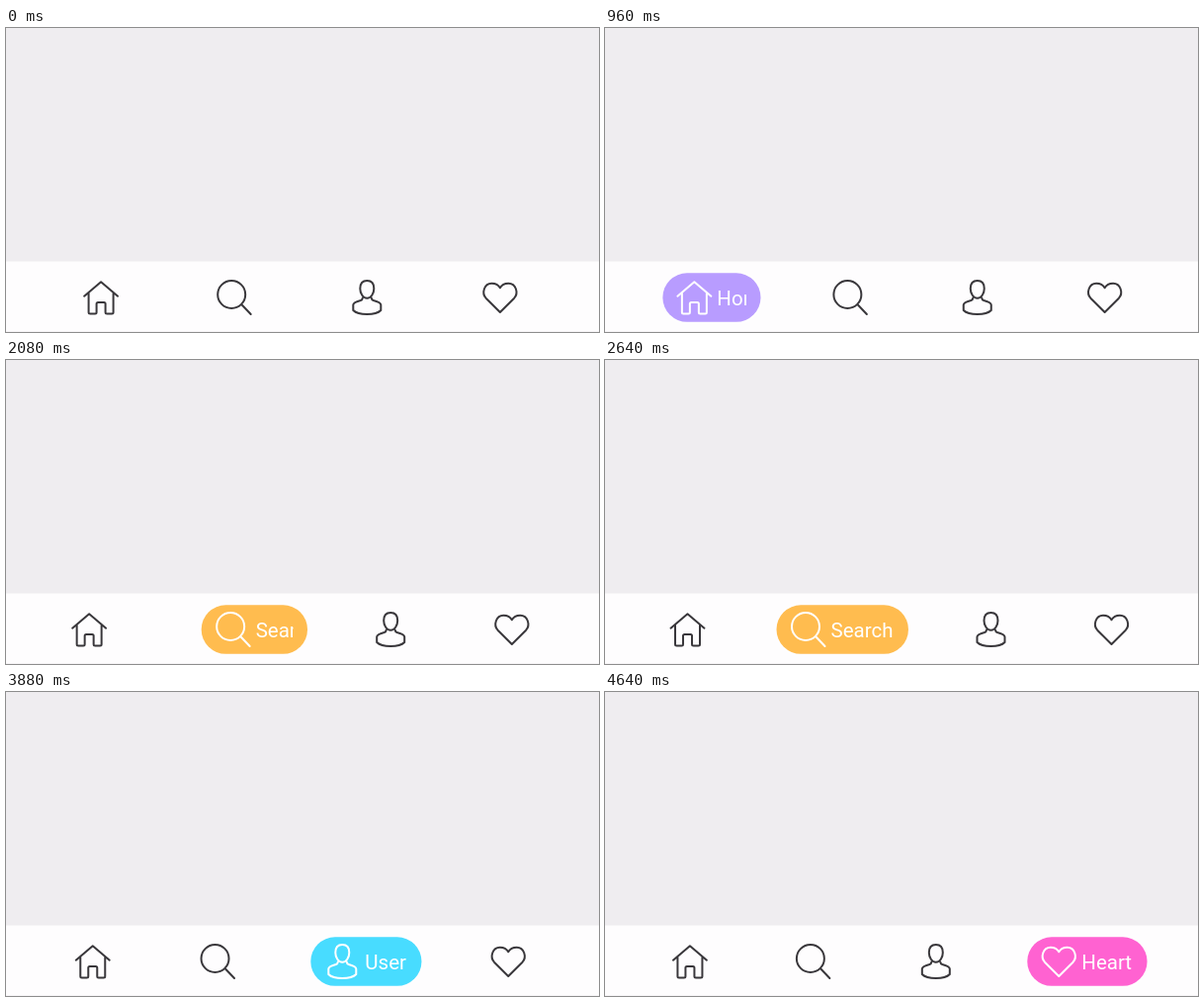
Write an HTML page with a canvas that moves like this. It is 600x308 px and loops after 5960 ms.

```html
<!DOCTYPE html>
<html lang="en">
<head>
<meta charset="utf-8">
<title>Bubble tab bar</title>
<style>
  html, body { margin: 0; width: 100%; height: 100%; overflow: hidden; background: #efedf0; }
  canvas { display: block; }
</style>
</head>
<body>
<canvas id="stage" width="600" height="308"></canvas>
<script>
const ctx = document.getElementById('stage').getContext('2d');
const LOOP = 5960, DURATION = 450;
const BAR_WIDTH = 602.5, TAB_WIDTH = 70.5;

// Icon paths are centred on x = 0 and use stage y values.
const tabs = [
  { label: 'Home', color: '#b89cff', start: 800, icon:
    'M-17 271.7L0 257.2L17 271.7M-12.5 268.5V288Q-12.5 289.5 -11 289.5H-6Q-4.5 289.5 -4.5 288' +
    'V279.5Q-4.5 278 -3 278H3Q4.5 278 4.5 279.5V288Q4.5 289.5 6 289.5H11Q12.5 289.5 12.5 288V268.5' },
  { label: 'Search', color: '#ffbc4f', start: 1907, icon:
    'M11.5 270A14 14 0 1 1 -16.5 270A14 14 0 1 1 11.5 270M7.5 280L17 290' },
  { label: 'User', color: '#48dcff', start: 3080, icon:
    'M0 256C5 256 7 259 7 264C7 269 4 273.7 0 273.7C-4 273.7 -7 269 -7 264C-7 259 -5 256 0 256Z' +
    'M-4.5 273.5Q-4.5 275.3 -6.5 276Q-14 278 -14 280.5V286Q-10 290 0 290Q10 290 14 286V280.5' +
    'Q14 278 6.5 276Q4.5 275.3 4.5 273.5' },
  { label: 'Heart', color: '#ff62d1', start: 3910, icon:
    'M0 288L-14.3 273.7C-19 268.5 -16 258.7 -8.5 258.7C-4.5 258.7 -1.5 260.5 0 263.3' +
    'C1.5 260.5 4.5 258.7 8.5 258.7C16 258.7 19 268.5 14.3 273.7Z' }
];

ctx.font = '20.5px Roboto, Arial, sans-serif';
ctx.lineWidth = 2;
ctx.lineCap = ctx.lineJoin = 'round';
for (const tab of tabs) {
  tab.path = new Path2D(tab.icon);
  tab.textWidth = ctx.measureText(tab.label).width;
}

// cubic-bezier(0.4, 0, 0.2, 1), solved by bisection
function ease(x) {
  if (x <= 0) return 0;
  if (x >= 1) return 1;
  let lo = 0, hi = 1, s;
  for (let i = 0; i < 20; i++) {
    s = (lo + hi) / 2;
    const r = 1 - s;
    if (1.2 * s * r * r + 0.6 * s * s * r + s ** 3 < x) lo = s; else hi = s;
  }
  return s * s * (3 - 2 * s);
}

function drawBubble(tab, left, width) {
  ctx.fillStyle = tab.color;
  ctx.beginPath();
  ctx.roundRect(left, 248.3, width, 49.5, 24.75);
  ctx.fill();

  ctx.save();
  ctx.beginPath();
  ctx.rect(left, 248, width - 14.5, 50);
  ctx.clip();
  ctx.fillStyle = '#fff';
  ctx.fillText(tab.label, left + 55, 281);
  ctx.restore();
}

function draw(time) {
  const active = tabs.filter(tab => time >= tab.start).length - 1;
  const progress = active < 0 ? 0 : ease((time - tabs[active].start) / DURATION);
  const widths = tabs.map((tab, i) => {
    const open = i === active ? progress : i === active - 1 ? 1 - progress : 0;
    return TAB_WIDTH + tab.textWidth * open;
  });
  const gap = (BAR_WIDTH - widths.reduce((a, b) => a + b)) / 5;

  ctx.fillStyle = '#efedf0';
  ctx.fillRect(0, 0, 600, 308);
  ctx.fillStyle = '#fefdfe';
  ctx.fillRect(0, 236.5, 600, 70.5);
  ctx.fillStyle = '#f6f4f6';
  ctx.fillRect(0, 307, 600, 1);

  let left = gap;
  tabs.forEach((tab, i) => {
    if (i === active) drawBubble(tab, left, widths[i]);
    ctx.save();
    ctx.translate(left + 32, 0);
    ctx.strokeStyle = i === active ? '#fff' : '#39373b';
    ctx.stroke(tab.path);
    ctx.restore();
    left += widths[i] + gap;
  });
}

function tick() {
  draw(performance.now() % LOOP);
  requestAnimationFrame(tick);
}
tick();
</script>
</body>
</html>
```
